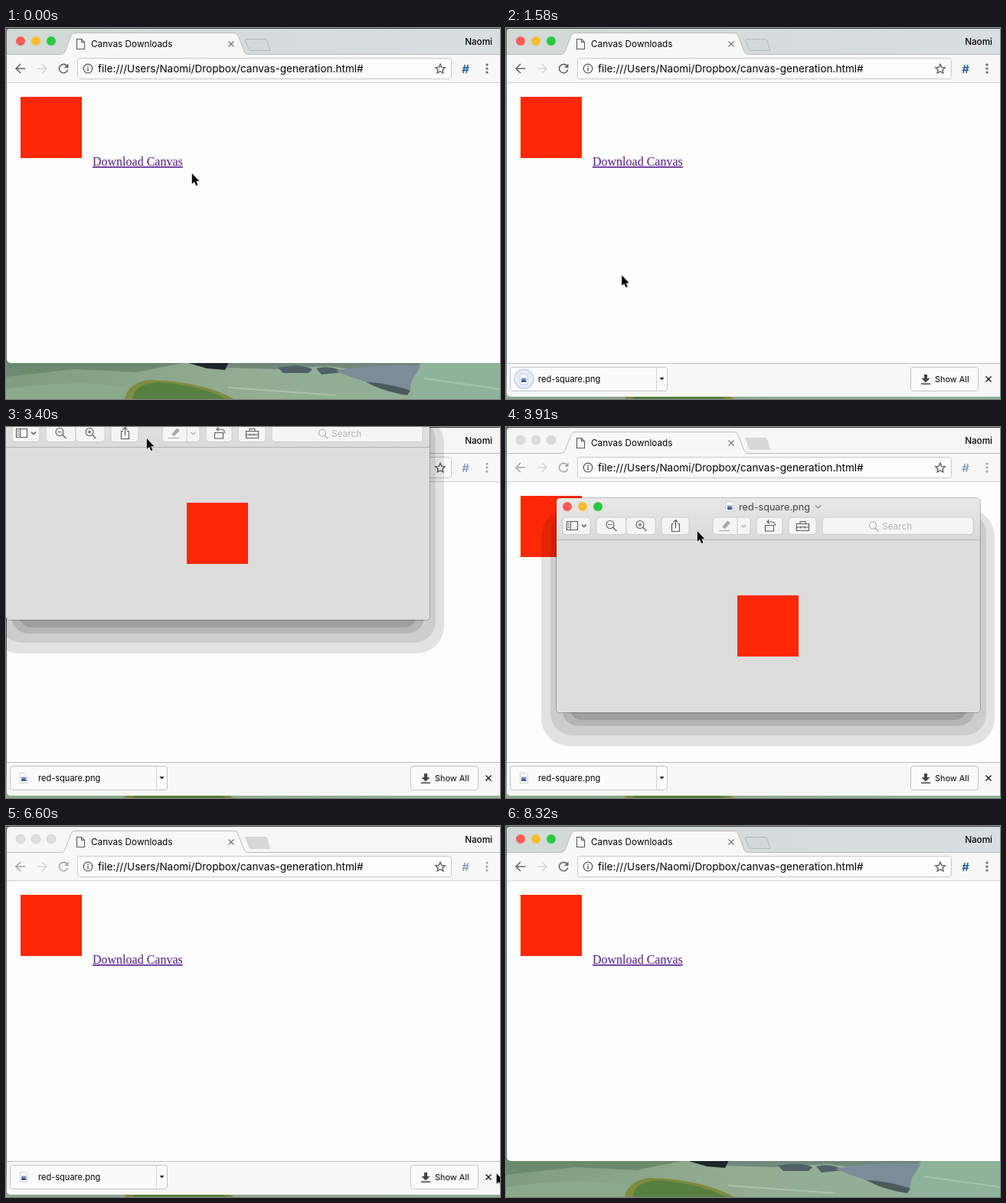
Write an HTML page that moves like this. It is 645 px wide and 485 px high and loops after 9330 ms.

```html
<!DOCTYPE html>
<html lang="en">
<head>
<meta charset="utf-8">
<title>Canvas Downloads</title>
<style>
  html, body { margin: 0; width: 100%; height: 100%; overflow: hidden; }
  body { position: relative; background: #86a488; }
  svg { position: absolute; left: 0; top: 0; width: 645px; height: 485px; overflow: hidden; }
  text { font-family: Inter, "Open Sans", sans-serif; fill: #050505; }
  .link { font: 16px "Liberation Serif", "Noto Serif", serif; fill: #551a8b; text-decoration: underline; }
  .line { fill: none; stroke: #5a5a5a; stroke-width: 1.1; }
  .thick { fill: none; stroke: #666; stroke-width: 1.6; }
  .btn { fill: #fbfbfb; stroke: #c3c3c3; }
  .tool { fill: #f5f5f5; stroke: #cbcbcb; }
  .pale { stroke: #a9a9a9; }

  /* one shared loop */
  .win, .on, .off, .dim, .hand, .arrow, .bubble, .cover, .ring, .drop,
  .preview, .moved, .body, .glyphs, .hover, .cursor {
    animation: 9330ms linear infinite;
  }
  .on, .off, .dim, .hand, .arrow, .bubble, .preview, .glyphs, .hover {
    animation-timing-function: step-end;
  }

  .win {
    position: absolute; left: 1px; top: 1px; width: 650px; height: 437px; overflow: hidden;
    border-radius: 5px 0 0 5px; background: #fdfdfd; box-shadow: 0 0 1px rgba(0,0,0,.4);
    animation-name: shelf;
  }
  .win svg { left: -1px; top: -1px; }
  @keyframes shelf {
    0%, 7% { height: 437px; }
    8%, 84.6% { height: 481px; }
    86.8%, 100% { height: 437px; }
  }

  /* browser focus */
  .on { animation-name: on; }
  .off { animation-name: off; }
  .dim { animation-name: dim; }
  @keyframes on { 0% { opacity: 1; } 24% { opacity: 0; } 77.06%, 100% { opacity: 1; } }
  @keyframes off { 0% { opacity: 0; } 24% { opacity: 1; } 77.06%, 100% { opacity: 0; } }
  @keyframes dim { 0% { opacity: 1; } 24% { opacity: .55; } 77.06%, 100% { opacity: 1; } }

  /* link hover */
  .hand { animation-name: hand; }
  .arrow { animation-name: arrow; }
  .bubble { animation-name: bubble; }
  @keyframes hand { 0% { opacity: 0; } 2.7% { opacity: 1; } 13.8%, 100% { opacity: 0; } }
  @keyframes arrow { 0% { opacity: 1; } 2.7% { opacity: 0; } 13.8%, 100% { opacity: 1; } }
  @keyframes bubble { 0% { opacity: 0; } 3.5% { opacity: 1; } 14.3%, 100% { opacity: 0; } }

  /* download */
  .cover { animation-name: cover; }
  @keyframes cover {
    0%, 7.5% { transform: translateX(0); }
    11.2%, 100% { transform: translateX(208px); }
  }
  .ring { animation-name: ring; }
  @keyframes ring {
    0%, 8% { opacity: 0; }
    14% { opacity: 1; }
    19.8% { opacity: .15; }
    24.4%, 26.5% { opacity: 1; }
    33.6%, 100% { opacity: 0; }
  }
  .drop { animation-name: drop; }
  @keyframes drop {
    0%, 7.98% { transform: translateY(211px); opacity: 0; }
    9.2% { opacity: .45; }
    10.3% { opacity: .6; }
    11.6% { opacity: .45; }
    12.75%, 100% { transform: translateY(325px); opacity: 0; }
  }

  /* image viewer */
  .preview { animation-name: preview; }
  @keyframes preview { 0% { opacity: 0; } 24% { opacity: 1; } 58.3%, 100% { opacity: 0; } }
  .moved { animation-name: moved; }
  @keyframes moved {
    0%, 39.55% { transform: translate(0, -28px); }
    41.9% { transform: translate(66px, 93px); }
    43.8%, 100% { transform: translate(66px, 95px); }
  }
  .body { animation-name: body; }
  @keyframes body { 0%, 24.66% { opacity: .01; } 26.5%, 100% { opacity: 1; } }
  .glyphs { animation-name: glyphs; }
  @keyframes glyphs { 0% { opacity: 0; } 52.5%, 100% { opacity: 1; } }
  .hover { animation-name: hover; }
  @keyframes hover { 0% { opacity: 0; } 72.3% { opacity: 1; } 84.6%, 100% { opacity: 0; } }

  .cursor { animation-name: cursor; }
  @keyframes cursor {
    0%, .54% { transform: translate(242px, 189px); animation-timing-function: ease-in-out; }
    4.8% { transform: translate(206px, 178px); }
    12.9% { transform: translate(206px, 178px); animation-timing-function: ease-in-out; }
    20.4% { transform: translate(108px, 432px); }
    27.3% { transform: translate(108px, 432px); animation-timing-function: ease-in; }
    31% { transform: translate(205px, 255px); }
    32.7% { transform: translate(243px, 125px); }
    33.9% { transform: translate(205px, 3px); }
    34.5%, 36.43% { transform: translate(184px, 12px); }
    36.44%, 39.55% { transform: translate(183px, 14px); }
    41.9% { transform: translate(249px, 135px); }
    43.8% { transform: translate(249px, 137px); }
    45.5% { transform: translate(249px, 137px); animation-timing-function: ease-in; }
    51% { transform: translate(140px, 112px); }
    53.6% { transform: translate(84px, 91px); animation-timing-function: ease-out; }
    55.09% { transform: translate(77px, 106px); }
    61% { transform: translate(77px, 106px); animation-timing-function: ease-in; }
    66.8% { transform: translate(609px, 432px); }
    67.5% { transform: translate(652px, 446px); }
    70.1% { transform: translate(652px, 451px); }
    70.7% { transform: translate(640px, 453px); animation-timing-function: ease-out; }
    73.5%, 88.4% { transform: translate(629px, 457px); }
    89.1%, 100% { transform: translate(629px, 490px); }
  }
</style>
</head>
<body>

<!-- pond wallpaper -->
<svg viewBox="0 0 645 485">
  <defs>
    <linearGradient id="pond" x2="1"><stop stop-color="#7f9d80"/><stop offset=".5" stop-color="#93ad93"/><stop offset="1" stop-color="#8fb198"/></linearGradient>
  </defs>
  <rect width="645" height="485" fill="url(#pond)"/>
  <path d="M0 0H645V1H0Z" fill="#3a463e"/>
  <path d="M0 1H1V438H0Z" fill="#557253"/>
  <path d="M0 436H240L170 450 90 446 0 456Z" fill="#6b8a6f"/>
  <path d="M0 472Q90 458 160 470L150 485H0Z" fill="#8aaa8b"/>
  <path d="M232 436H292L286 447 262 445Z" fill="#1d272a"/>
  <path d="M292 436H545L535 444 470 448 420 442 350 446 288 444Z" fill="#71887c"/>
  <path d="M355 444Q385 438 400 446L395 451H362Z M405 445Q425 440 440 450L412 453Z" fill="#4f6067"/>
  <path d="M430 448Q490 438 545 442 526 458 528 474 480 470 430 448Z" fill="#7b8d99"/>
  <path d="M470 463Q500 464 528 474L524 480Q495 476 470 463Z" fill="#4c5a5c"/>
  <path d="M545 436H645V485H532Q528 460 545 436Z" fill="#8fb29a"/>
  <path d="M290 470 430 480M545 458 645 472" stroke="#a9c3aa" stroke-width="2"/>
  <path d="M155 485Q160 462 190 460 255 462 298 485Z" fill="#7f8b3f"/>
  <path d="M166 485Q166 466 198 463 250 466 288 485Z" fill="#568040"/>
</svg>

<div class="win">
<svg viewBox="0 0 645 485">
  <defs>
    <linearGradient id="strip" x2="1"><stop stop-color="#d2d9d6"/><stop offset="1" stop-color="#d9dee0"/></linearGradient>
    <linearGradient id="blue" x2="0" y2="1"><stop stop-color="#708ac5"/><stop offset="1" stop-color="#4d5382"/></linearGradient>
    <linearGradient id="snow" x2="0" y2="1"><stop stop-color="#fff"/><stop offset="1" stop-color="#d9dce4"/></linearGradient>
    <g id="lights">
      <circle r="6" fill="#fc5b57"/>
      <circle cx="20" r="6" fill="#fdbc2e"/>
      <circle cx="40" r="6" fill="#2ac940"/>
    </g>
    <g id="file">
      <path d="M-4.5-6.5H2.5L5-4V6.5H-4.5Z" fill="#fff" stroke="#c5c5c5" stroke-width=".8"/>
      <path d="M-3-1.5H3.5V4H-3Z" fill="#7d93c2"/>
      <path d="M-3 2 0 .5 3.5 3V4H-3Z" fill="#47567c"/>
    </g>
    <path id="cross" d="M-3.5-3.5 3.5 3.5M3.5-3.5-3.5 3.5"/>
  </defs>

  <!-- tab strip -->
  <rect width="645" height="35" fill="#f6f6f6"/>
  <rect class="on" width="645" height="35" fill="url(#strip)"/>
  <rect y="35" width="645" height="37" fill="#f8f8f8"/>
  <path d="M72 36V34.5Q75.500 34.500 77 31L85 10Q86.500 6.500 90 6.500H298Q301.500 6.500 303 10L311 31Q312.500 34.500 316 34.500V36Z" fill="#f8f8f8"/>
  <path d="M0 34.500H72Q75.500 34.500 77 31L85 10Q86.500 6.500 90 6.500H298Q301.500 6.500 303 10L311 31Q312.500 34.500 316 34.500H645" fill="none" stroke="#b9bcbc"/>
  <path class="on" d="M314 14.500H338Q340 14.500 341 16.500L345 29.500H320Q318 29.500 317 27.500L312 15.500Z" fill="#d2d8d8" stroke="#b3b8b8"/>
  <path class="off" d="M312 14H338Q340 14 341 16L345.500 30H320Q318 30 317 28Z" fill="#d8d8d8"/>
  <g class="off" fill="#dcdcdc" stroke="#cbcbcb" stroke-width=".6"><circle cx="19" cy="17" r="6"/><circle cx="39" cy="17" r="6"/><circle cx="59" cy="17" r="6"/></g>
  <g class="on"><use href="#lights" x="19" y="17"/></g>
  <path d="M92.500 14.500H98.500L102.500 18.500V27.500H92.500ZM98.500 14.500V18.500H102.500" class="line"/>
  <text x="111" y="25" font-size="11.75">Canvas Downloads</text>
  <use href="#cross" x="294" y="21" stroke="#777" stroke-width="1.3"/>
  <text x="635" y="22" font-size="11.7" font-weight="500" text-anchor="end">Naomi</text>

  <!-- toolbar -->
  <g class="dim">
    <path d="M25.500 53H13.500M19 47 13 53 19 59" class="thick"/>
    <path d="M79.500 49.300A5.700 5.700 0 1 0 80.700 54.500" class="thick"/><path d="M81.500 46.500V52H76Z" fill="#666"/>
    <text x="595" y="58.500" font-size="15" font-weight="600" font-style="italic" style="fill:#1f5596">#</text>
    <g fill="#666"><circle cx="628" cy="48" r="1.600"/><circle cx="628" cy="53" r="1.600"/><circle cx="628" cy="58" r="1.600"/></g>
  </g>
  <path d="M40.500 53H52.500M47 47 53 53 47 59" class="thick" style="stroke:#d6d6d6"/>
  <rect x="93.500" y="39.500" width="488" height="27" rx="3" fill="#fdfdfd" stroke="#c9c9c9"/>
  <circle cx="107" cy="53" r="5.800" class="line" style="stroke-width:1.300"/>
  <path d="M107 52V56.500M107 49.500V51" stroke="#5a5a5a" stroke-width="1.400"/>
  <text x="120" y="58" font-size="13.57">file:///Users/Naomi/Dropbox/canvas-generation.html#</text>
  <path d="M567 47.200 568.800 51.300 573.300 51.700 569.900 54.700 570.900 59 567 56.700 563.100 59 564.100 54.700 560.700 51.700 565.200 51.300Z" class="line" style="stroke-width:1.300"/>
  <path d="M0 71.500H645" stroke="#d2d2d2"/>

  <!-- page -->
  <rect x="19" y="90" width="80" height="80" fill="#ff2806"/>
  <text class="link" x="113" y="180">Download Canvas</text>

  <!-- shelf -->
  <rect y="438" width="645" height="47" fill="#f7f7f7"/>
  <path d="M0 438.500H645" stroke="#bdbdbd"/>
  <rect x="5.500" y="443.500" width="205" height="31" rx="3" class="btn"/>
  <path d="M196.500 444V474" stroke="#d2d2d2"/>
  <path d="M200.500 457H206.500L203.500 460.500Z" fill="#222"/>
  <circle class="ring" cx="23.500" cy="459" r="12.500" fill="#d3e2f6" stroke="#9fc1e8" stroke-width="1.800"/>
  <use href="#file" x="23" y="459"/>
  <text x="42" y="463" font-size="11.050">red-square.png</text>
  <rect class="cover" x="5" y="440" width="208" height="40" fill="#f7f7f7"/>
  <rect x="528.500" y="443.500" width="88" height="31" rx="3" class="btn"/>
  <path d="M546 453H550V458H553.500L548 463.500 542.500 458H546ZM542 464.500H554V466H542Z" fill="#444"/>
  <text x="560" y="463" font-size="10.900">Show All</text>
  <circle class="hover" cx="630" cy="459" r="7" fill="#c9c9c9"/>
  <use href="#cross" x="630" y="459" stroke="#222" stroke-width="1.500"/>

  <g class="bubble">
    <path d="M.5 437.500V420.500H212.500Q215.500 420.500 215.500 423.500V437.500Z" fill="#f6f6f6" stroke="#a8a8a8"/>
    <text x="5" y="433" font-size="11.050">/Users/…/canvas-generation.html</text>
  </g>
  <g class="drop">
    <rect x="6" width="118" height="113" rx="11" fill="url(#blue)"/>
    <path d="M44 18H86Q90 18 90 22V50H102Q107 51 104 55L69 93Q65 97 61 93L26 55Q23 51 28 50H40V22Q40 18 44 18Z" fill="url(#snow)"/>
  </g>
</svg>
</div>

<!-- image viewer and pointer -->
<svg viewBox="0 0 645 485">
  <defs>
    <linearGradient id="bar" x2="0" y2="1"><stop stop-color="#e7e7e7"/><stop offset="1" stop-color="#dadada"/></linearGradient>
    <clipPath id="outside"><path clip-rule="evenodd" d="M-60-60H640V400H-60ZM5 0H548Q553 0 553 5V275Q553 280 548 280H5Q0 280 0 275V5Q0 0 5 0Z"/></clipPath>
  </defs>
  <g class="preview"><g class="moved">
    <g clip-path="url(#outside)">
      <rect x="-20" y="14" width="592" height="310" rx="36" opacity=".105"/>
      <rect x="-8" y="17" width="569" height="293" rx="28" opacity=".09"/>
      <rect x="7" y="30" width="539" height="268" rx="22" opacity=".115"/>
      <rect x="17" y="40" width="519" height="250" rx="16" opacity=".13"/>
    </g>
    <rect x="-.5" y="-.5" width="554" height="281" rx="5" fill="none" stroke="#000" stroke-opacity=".25"/>
    <g class="body">
      <rect width="553" height="280" rx="5" fill="#ddd"/>
      <path d="M0 55V5Q0 0 5 0H548Q553 0 553 5V55Z" fill="url(#bar)"/>
      <path d="M0 54.500H553" stroke="#b4b4b4"/>
      <use href="#lights" x="14" y="11"/>
      <g class="glyphs" stroke="#5b1d10" stroke-width="1.300" fill="none">
        <path d="M11.500 8.500 16.500 13.500M16.500 8.500 11.500 13.500"/>
        <path d="M30.500 11H37.500" stroke="#8a5a08"/>
        <path d="M51 8.500V14H56.500ZM52 8H57V13Z" fill="#0b5c16" stroke="none"/>
      </g>
      <use href="#file" x="226" y="11"/>
      <text x="238" y="15.500" font-size="12.650" style="fill:#444">red-square.png</text>
      <path d="M338 9.500 341.500 13 345 9.500" class="line" style="stroke:#888"/>

      <g class="tool">
        <rect x="8" y="25" width="36" height="22.500" rx="4"/>
        <rect x="52" y="25" width="39" height="22.500" rx="4"/>
        <rect x="91" y="25" width="38" height="22.500" rx="4"/>
        <rect x="137" y="25" width="36" height="22.500" rx="4"/>
        <rect x="204" y="25" width="49" height="22.500" rx="4"/>
        <rect x="261" y="25" width="34" height="22.500" rx="4"/>
        <rect x="303" y="25" width="36" height="22.500" rx="4"/>
        <rect x="347" y="25" width="197" height="22.500" rx="4"/>
        <path d="M236 25V47.500"/>
      </g>
      <g class="line">
        <path d="M13.500 30.500H27.500V41.500H13.500ZM18.500 30.500V41.500M15 33.500H17M15 36H17M15 38.500H17"/>
        <path d="M33 34.500 36 37.500 39 34.500" stroke-width="1.500"/>
        <circle cx="70" cy="34.500" r="5"/><path d="M67.500 34.500H72.500M73.500 38 78.500 43"/>
        <circle cx="109" cy="34.500" r="5"/><path d="M106.500 34.500H111.500M109 32V37M112.500 38 117.500 43"/>
        <path d="M153 33.500H150.500V43.500H160.500V33.500H158M155.500 39V28.500M152.500 31.500 155.500 28.500 158.500 31.500"/>
        <path d="M272.500 35.500H283.500V43H272.500ZM275 31H280Q285.500 31 285.500 36M277.500 28.500 275 31 277.500 33.500"/>
        <path d="M313.500 33.500H329.500V42.500H313.500ZM318 33.500V30.500H325V33.500M313.500 38H329.500M319 36.500V39.500M324 36.500V39.500"/>
      </g>
      <path d="M216 38 223 29.500 227 32 220 40Z" fill="#a9a9a9"/><path d="M212 42.500H226" class="line pale"/>
      <path d="M241.500 35 244.500 38 247.500 35" class="line pale"/>
      <circle cx="413" cy="35.500" r="4.500" class="line pale"/><path d="M416 39 420 43" class="line pale"/>
      <text x="425" y="41" font-size="11.800" style="fill:#b5b5b5">Search</text>
      <rect x="236" y="127" width="80" height="80" fill="#ff2806"/>
    </g>
  </g></g>

  <g class="cursor" stroke-linejoin="round">
    <path class="arrow" d="M.8 1V14.800L4 12 6.200 17 8.400 16 6.200 11.200H10.400Z" fill="#000" stroke="#fff" paint-order="stroke"/>
    <path class="hand" d="M-1.500.5Q0-1.500 1.300.5L2.300 5Q3.500 3.800 4.800 5.300 6 4.500 7.200 6 9 5.500 9.300 7.500V11L7.500 16H0L-4.500 9.500Q-5.500 7-3.500 7.200L-.5 9.500Z" fill="#fff" stroke="#000" stroke-width="1.200"/>
  </g>
</svg>
</body>
</html>
```
